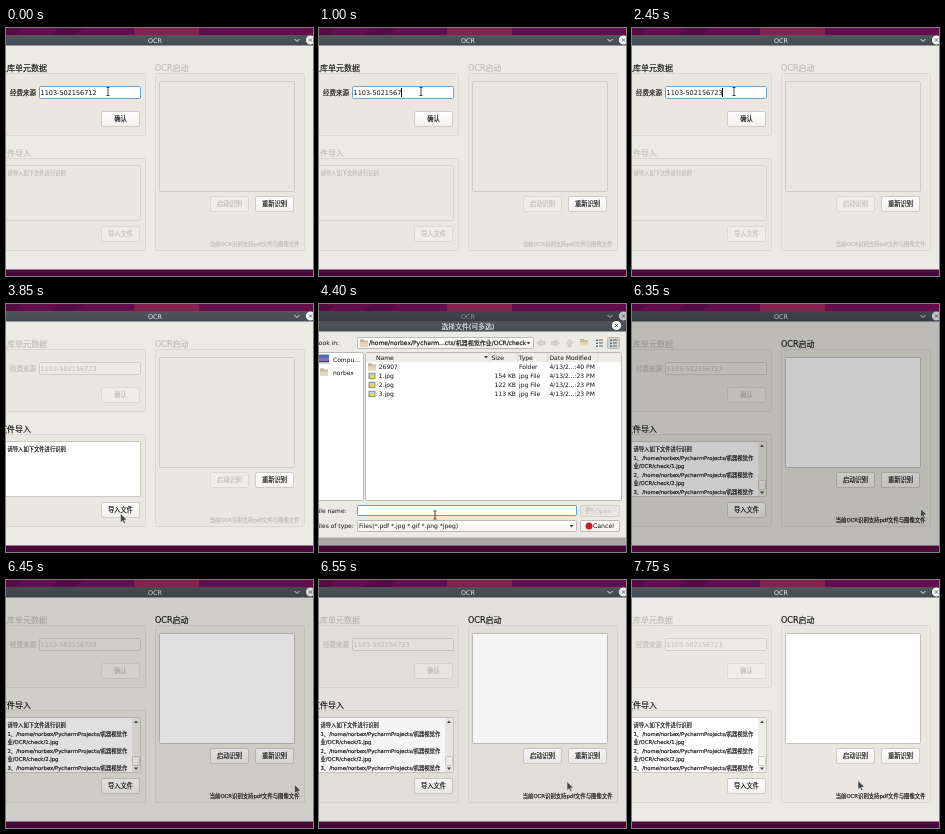
Write an HTML page that moves like this. It is 307 px wide and 248 px high and loops after 8000 ms.

```html
<!DOCTYPE html>
<html lang="zh-CN">
<head>
<meta charset="utf-8">
<title>OCR</title>
<style>
  html, body { margin: 0; width: 100%; height: 100%; overflow: hidden; background: #eceae4; }
  svg { display: block; width: 307px; height: 248px; }
  text { font-family: "DejaVu Sans", "Noto Sans CJK SC", "Noto Sans CJK", sans-serif; white-space: pre; }
</style>
</head>
<body>
<svg id="stage" viewBox="0 0 307 248" xmlns="http://www.w3.org/2000/svg"></svg>
<script>
const LOOP = 8000, STEP = 50;
const INK = '#101010', FAINT = '#bfbcb6', BODY = '#eceae4', BLUE = '#308cc6', EDGE = '#bcb9b3';
const USER = 'norbex';
const stage = document.getElementById('stage');

const rect = (x, y, w, h, fill, extra = '') =>
  `<rect x="${x}" y="${y}" width="${w}" height="${h}" fill="${fill}" ${extra}/>`;
const box = (x, y, w, h, fill, stroke = EDGE, r = 1) =>
  rect(x + .5, y + .5, w - 1, h - 1, fill, `stroke="${stroke}" stroke-width="1" rx="${r}"`);
const path = (d, stroke, width = 1, fill = 'none') =>
  `<path d="${d}" fill="${fill}" stroke="${stroke}" stroke-width="${width}"/>`;
// Small Chinese glyphs get a hairline outline to look hinted.
const text = (x, y, s, size = 6, fill = INK, anchor = 'start') =>
  `<text x="${x}" y="${y}" font-size="${size}" fill="${fill}" text-anchor="${anchor}"` +
  (/[一-龥]/.test(s) ? ` stroke="${fill}" stroke-width=".15"` : '') + `>${s}</text>`;
const layer = (opacity, content) => `<g opacity="${opacity}">${content}</g>`;
const ramp = (t, from, to) => Math.min(1, Math.max(0, (t - from) / (to - from)));
const ink = on => on ? INK : FAINT;
const downArrow = (x, y) => path(`M${x - 2} ${y}h4l-2 2.5Z`, 'none', 0, '#444');

function button(x, y, label, on, pressed) {
  const fill = pressed ? '#d3d0ca' : on ? 'url(#face)' : '#efede8';
  return box(x, y, 39, 16, fill, on ? '#cfccc6' : '#dcd9d3', 1.5) +
    text(x + 19.5, y + 10.4, label, 6.3, ink(on), 'middle');
}

function group(x, y, w, h, title, titleX, on) {
  return box(x, y, w, h, '#eae7e1', '#dbd8d2') + text(titleX, y - 2, title, 8, ink(on));
}

function titleBar(y, label, size, color) {
  return rect(0, y, 307, 10.5, 'url(#bar)') + text(149, y + 7.7, label, size, color, 'middle');
}

function closeButton(x, y) {
  return `<circle cx="${x}" cy="${y}" r="4.6" fill="#f5f5f5"/>` +
    path(`M${x - 1.6} ${y - 1.6}l3.2 3.2m0 -3.2l-3.2 3.2`, '#4a4f55', .8);
}

function desktop() {
  return rect(0, 0, 307, 248, '#650d4c') + rect(128, 0, 65, 7, '#86204f') +
    path('M0 0H16L10 7H0ZM52 0H78L70 7H45Z', 'none', 0, '#560b43') +
    rect(0, 241, 307, 7, '#4b083b');
}

function typed(t) {
  const tail = t < 800 ? '12' : t < 1000 ? '1' : t < 2200 ? '' : t < 2450 ? '2' : '23';
  return '1103-5021567' + tail;
}

function caretOn(t) {
  return t >= 400 && t < 1550 || t >= 2050 && t < 2950;
}

function sourceField(t, on) {
  const value = typed(t), size = 6.5;
  const end = 34.5 + size * (.636 * (value.length - 1) + .361);
  return text(4, 67, '经费来源', 6.5, ink(on)) +
    box(33, 58, 102, 13, on ? '#fff' : BODY, on ? '#6aa6cd' : '#cfccc6') +
    text(34.5, 66.5, value, size, ink(on)) +
    (on && caretOn(t) ? rect(Math.floor(end), 60, 1, 9, INK) : '');
}

function fileLog(on, loaded) {
  const lines = ['请导入如下文件进行识别'];
  if (loaded) for (const n of [1, 2, 3])
    lines.push(`${n}、/home/${USER}/PycharmProjects/机器视觉作`, `业/OCR/check/${n}.jpg`);
  const rows = lines.map((s, i) => text(1.5, 147 + i * 8.6, s, 5.3, ink(on))).join('');
  const bar = rect(126, 138, 8, 54, '#efede8') + box(126, 176, 8, 10, '#f7f6f3', '#cfccc6') +
    path('M128 143l2-2.5 2 2.5Z', 'none', 0, '#444') + downArrow(130, 187.5);
  return box(-2, 137, 137, 56, on ? '#fff' : '#eae7e1', on ? '#cbc8c2' : '#d7d4ce') +
    `<g clip-path="url(#log)">${rows}</g>` + (loaded ? bar : '');
}

function mainWindow(t) {
  const first = t < 3300, second = t >= 3300, loaded = t >= 6200;
  const modal = t >= 4200 && t < 6350;
  return rect(0, 17, 307, 224.5, BODY) +
    titleBar(7, 'OCR', 6.4, modal ? '#b5b8ba' : '#f0f0f0') +
    path('M288.5 11l2.5 2.5 2.5-2.5', '#f0f0f0', 1) + closeButton(304.5, 12) +
    group(-8, 45, 148, 63, '入库单元数据', -7, first) + sourceField(t, first) +
    button(95, 83, '确认', first, t >= 3250 && first) +
    group(-8, 130, 148, 93, '文件导入', -7, second) + fileLog(second, loaded) +
    button(95, 198, '导入文件', second, t >= 4150 && t < 4200) +
    group(149, 45, 150, 178, 'OCR启动', 149, loaded) +
    box(153, 53, 136, 111, loaded ? '#fff' : '#eae7e1', loaded ? '#c3c0ba' : '#cfccc6') +
    button(204, 168, '启动识别', loaded, t >= 7200 && t < 7300) +
    button(249, 168, '重新识别', true) +
    text(293.5, 217.5, '当前OCR识别支持pdf文件与图像文件', 5.35, ink(loaded), 'end');
}

const folder = (x, y) => rect(x, y, 4, 2, '#b5a382') + rect(x, y + 1, 8, 6, '#cbbb9b') +
  rect(x, y + 3, 8, 4, '#e3d6bd');
const picture = (x, y) => rect(x, y, 7, 6.5, '#8f9a6a') + rect(x + 1, y + 1, 5, 2.5, '#a9d2e6') +
  rect(x + 1.5, y + 3, 4.5, 2.5, '#ecd53f');

function toolbar() {
  const arrow = (x, y, turn) =>
    `<path transform="translate(${x} ${y}) rotate(${turn})" d="M-4 0L0-3.5V-1.5H4V1.5H0V3.5Z" fill="#d9d6d0" stroke="#c6c3bd" stroke-width=".7"/>`;
  const lines = x => [0, 3, 6].map(d =>
    rect(x, 35.5 + d, 2, 1.5, '#3b6f9c') + rect(x + 3, 35.5 + d, 4, 1, '#666')).join('');
  return arrow(222, 39, 0) + arrow(236.5, 39, 180) + arrow(250.5, 39, 90) +
    folder(261, 35) + lines(277) + box(288, 33, 13, 12, '#d6d3cd') + lines(291);
}

function fileList(picked) {
  const files = [['26907', '', 'Folder', '40'], ['1.jpg', '154 KB', 'jpg File', '23'],
    ['2.jpg', '122 KB', 'jpg File', '23'], ['3.jpg', '113 KB', 'jpg File', '23']];
  const head = [[57, 'Name'], [172.5, 'Size'], [200, 'Type'], [230.5, 'Date Modified']];
  return box(46, 48, 257, 149, '#fff') + rect(47, 49, 255, 9, '#efede8') +
    [170.5, 198.5, 228.5, 278.5].map(x => rect(x, 49, .8, 9, '#d3d0ca')).join('') +
    head.map(([x, s]) => text(x, 55.5, s)).join('') + downArrow(167, 52) +
    files.map(([name, size, kind, minute], i) => {
      const y = 58.5 + i * 9, on = i > 3 - picked, color = on ? '#fff' : INK;
      return (on ? rect(47, y, 232, 9, BLUE) : '') +
        (i ? picture(49.5, y + 1.2) : folder(49, y + .9)) +
        text(59.8, y + 6.5, name, 6, color) + text(197, y + 6.5, size, 6, color, 'end') +
        text(200, y + 6.5, kind, 6, color) + text(230.5, y + 6.5, `4/13/2...:${minute} PM`, 6, color);
    }).join('');
}

function computer() {
  return rect(0, 50.5, 10, 6.5, '#3f6fc0') + rect(0, 53.5, 10, 3.5, '#8a6fc0') +
    rect(0, 57, 10, 1.5, '#444') + rect(-1, 58.5, 12, 1.5, '#d5d5d5');
}

function dialog(t) {
  const picked = t < 5150 ? 0 : t < 5250 ? 1 : t < 5350 ? 2 : 3;
  const names = [1, 2, 3].slice(3 - picked).map(n => `"${n}.jpg"`).join(' ');
  const focus = t < 5000, ready = picked > 0;
  return rect(0, 27, 307, 206.5, BODY) +
    titleBar(17, '选择文件(可多选)', 6.8, '#f0f0f0') + closeButton(297.5, 21.5) +
    text(-3.4, 41.3, 'Look in:') +
    box(38, 33, 177, 12, 'url(#face)') + folder(41, 35.5) + downArrow(209.5, 38) +
    text(50, 41.3, `/home/${USER}/Pycharm...cts/机器视觉作业/OCR/check`) + toolbar() +
    box(-2, 48, 47, 149, '#fff') + computer() + text(14, 57.5, 'Compu...') +
    folder(1, 64.5) + text(14, 70.5, USER) +
    fileList(picked) +
    text(-3.4, 208.6, 'File name:') + text(-3.4, 224, 'Files of type:') +
    box(38, 201, 220, 11, '#fff', focus ? '#5e9fc9' : EDGE) + text(40, 208.4, names) +
    box(38, 216, 220, 12, 'url(#face)') + text(40, 224, 'Files(*.pdf *.jpg *.gif *.png *jpeg)') +
    downArrow(252.5, 221) +
    box(261, 201, 40, 12, t >= 6100 ? '#d3d0ca' : ready ? '#e3e9ed' : '#e9e6e0', ready ? '#83a9c2' : '#d3d0ca', 1.5) +
    layer(ready ? 1 : .4, rect(267, 203.5, 4, 3, '#9a9a98') + rect(267, 204.5, 8, 5.5, '#aaa9a5') +
      rect(268.5, 206.5, 7.5, 3.5, '#d8d5cc')) +
    text(276, 209, 'Open', 6.2, ink(ready)) +
    box(261, 216, 40, 12, 'url(#face)', EDGE, 1.5) +
    '<circle cx="270" cy="222" r="3.5" fill="#c5202a"/>' + text(274, 224.2, 'Cancel', 6.2);
}

// time, x, y of the pointer's tip
const POINTER = [[0, 102, 63.5], [2600, 102, 63.5], [3000, 112, 89], [3600, 112, 89],
  [3750, 107, 160], [3850, 114.5, 209.5], [4150, 114.5, 209.5], [4200, 116, 211], [4400, 116, 211],
  [4950, 190, 112], [5100, 190, 112], [5350, 165, 71], [5450, 165, 71], [5750, 235, 150],
  [5800, 235, 150], [5950, 288.5, 203.5], [6450, 288.5, 204.5], [6550, 248, 201.5],
  [6700, 248, 201.5], [6950, 218.5, 177.5], [7600, 218.5, 177.5], [7750, 226, 200.5], [8000, 226, 200.5]];

function pointer(t) {
  const i = Math.max(1, POINTER.findIndex(p => p[0] >= t));
  const [t0, x0, y0] = POINTER[i - 1], [t1, x1, y1] = POINTER[i];
  const k = ramp(t, t0, t1), e = k * k * (3 - 2 * k);
  const x = x0 + (x1 - x0) * e, y = y0 + (y1 - y0) * e;
  const beam = t < 2700 || t >= 4200 && t < 4500;
  if (beam) return path(`M${x - 1.5} ${y - 4}h3m-1.5 0v8m-1.5 0h3`, '#333', .9);
  return path(`M${x} ${y}v9l2-1.8 1.6 3 1.4-.7-1.5-2.9 3-.2Z`, '#f4f4f4', .5, '#42474c');
}

function render(t) {
  const shown = ramp(t, 4150, 4350) * (1 - ramp(t, 6100, 6300));
  const dim = .2 * ramp(t, 4150, 4400) * (1 - ramp(t, 6350, 6600));
  stage.innerHTML = `<defs>
    <linearGradient id="face" x2="0" y2="1"><stop stop-color="#fff"/><stop offset="1" stop-color="#f3f1ed"/></linearGradient>
    <linearGradient id="bar" x2="0" y2="1"><stop stop-color="#50565c"/><stop offset="1" stop-color="#434a51"/></linearGradient>
    <linearGradient id="shade" x2="0" y2="1"><stop stop-opacity=".12"/><stop offset="1" stop-opacity=".04"/></linearGradient>
    <clipPath id="log"><rect y="138" width="134" height="54"/></clipPath></defs>` +
    desktop() + mainWindow(t) +
    (dim ? rect(0, 7, 307, 234.5, '#000', `opacity="${dim}"`) : '') +
    (shown ? layer(shown, rect(0, 233, 307, 15, 'url(#shade)') + dialog(t)) : '') +
    pointer(t);
}

const start = performance.now();
let last = -1;
function frame(now) {
  const t = Math.floor(Math.max(0, now - start) % LOOP / STEP) * STEP;
  if (t !== last) render(last = t);
  requestAnimationFrame(frame);
}
frame(start);
</script>
</body>
</html>
```
